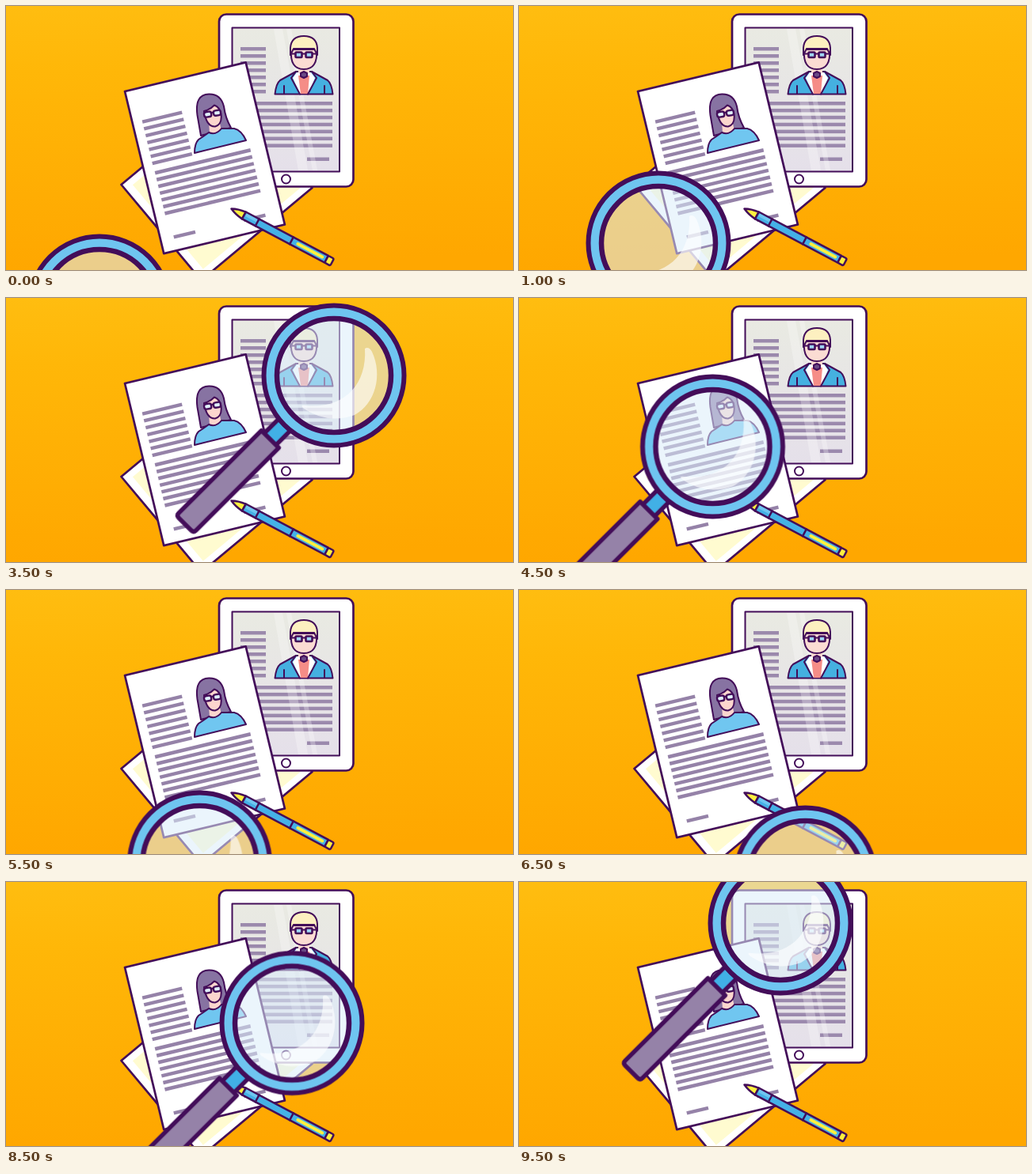
These frames come from a looping animation (640x334 px, 10 s). An HTML page:

```html
<!DOCTYPE html>
<html lang="en">
<head>
<meta charset="utf-8">
<title>Reviewing résumés</title>
<style>
  html, body { margin: 0; width: 100%; height: 100%; overflow: hidden; background: #ffb005; }
  svg { display: block; width: 100vw; height: 100vh; }
  .ink { stroke: #430d59; stroke-width: 2.7; stroke-linejoin: round; stroke-linecap: round; }
  .thin { stroke-width: 2; }
  .bar { fill: #9582a8; }
</style>
</head>
<body>
<svg viewBox="0 0 640 334">
  <defs>
    <linearGradient id="sky" x1="0" y1="0" x2=".06" y2="1">
      <stop offset="0" stop-color="#ffbd10"/>
      <stop offset=".25" stop-color="#ffb708"/>
      <stop offset="1" stop-color="#ffa700"/>
    </linearGradient>
    <linearGradient id="screen" x1="0" y1="0" x2="0" y2="1">
      <stop offset="0" stop-color="#e9eae2"/>
      <stop offset="1" stop-color="#e5e0ea"/>
    </linearGradient>
  </defs>
  <rect width="640" height="334" fill="url(#sky)"/>

  <!-- sheet at the back -->
  <g transform="translate(266 228)">
    <path class="ink" fill="#fff" d="M-120.5-2L-19.5 119L120.5 2L19.5-119Z"/>
    <path fill="#fffbd0" transform="scale(.88)" d="M-120.5-2L-19.5 119L120.5 2L19.5-119Z"/>
  </g>

  <!-- tablet -->
  <rect class="ink" x="269" y="10.5" width="169.500" height="218" rx="9" fill="#fff"/>
  <rect class="ink thin" x="285.5" y="27.5" width="135.5" height="182" fill="url(#screen)"/>
  <circle class="ink thin" cx="353.5" cy="219" r="5.5" fill="#fff"/>
  <g id="tabletText" opacity=".92"></g>
  <g fill="#fff" opacity=".28">
    <path d="M338 29H349L381 208H369Z"/>
    <path d="M354 29H360L393 208H387Z"/>
  </g>
  <g class="ink thin">
    <path fill="#45b0e0" d="M339.5 111.5Q341 98 346 94L366 83H386L406 94Q411 98 412.5 111.5Z"/>
    <path fill="#fff" stroke="none" d="M367 84L362 91L371 111H382L390 91L385 84Z"/>
    <path fill="#f58d87" stroke="none" d="M369 88L372 111H381L383 88Z"/>
    <path fill="#fbd9d0" stroke="none" d="M369 74V84L376 89L383 84V74Z"/>
    <path fill="none" d="M366 83L360 91L371 111.5M386 83L392 91L381 111.5M351 101V111M402 101V111"/>
    <path fill="#fbdcd3" d="M360 55Q358 80 376 80Q394 80 392 55Z"/>
    <path fill="#fdf0c0" d="M359 62V53Q360 38 376 38Q392 38 393 53V62L389 54H363Z"/>
    <path fill="none" d="M359 60.5H366M386 60.5H393M374 60.5H378"/>
    <g fill="#9fd6f4" stroke-width="2.6">
      <rect x="365.5" y="58.5" width="8" height="6.5" rx="1"/>
      <rect x="378.5" y="58.5" width="8" height="6.5" rx="1"/>
    </g>
    <path fill="#6a4a86" d="M372 85L376 83L380 85V89L376 91L372 89Z"/>
  </g>

  <!-- front sheet -->
  <g transform="translate(150 108) rotate(-13.5)">
    <rect class="ink" width="157" height="211" fill="#fff"/>
    <g id="sheetText"></g>
  </g>
  <g class="ink thin">
    <path fill="#8773a2" d="M241.500 138Q238 112 256 111.500Q271 111 275 127Q277 142 284 154L246 164Z"/>
    <path fill="#fcd6ce" stroke="none" d="M256 146L257 161Q266 164 272 158L269 144Z"/>
    <path fill="#fcd6ce" d="M250 133Q258 131 263 125.500Q270 128 271.500 137Q273 150 264 152.500Q253 153 250 133Z"/>
    <path fill="#70c6f0" d="M238 186Q238 174 243 169Q249 165 256 160Q265 164 272 155L288 155Q297 157 303 170Z"/>
    <g fill="#dff0fc" stroke-width="2.4" transform="rotate(-9 260 136)">
      <rect x="250" y="133" width="9" height="6.500" rx="2.500"/>
      <rect x="262" y="133" width="9" height="6.500" rx="2.500"/>
      <path d="M259 135H262"/>
    </g>
  </g>

  <!-- pen -->
  <g class="ink" style="stroke-width:2.5" transform="translate(284.5 256.5) rotate(28)">
    <path fill="#fff03f" d="M0 0Q8-4 18-5V5Q8 4 0 0Z"/>
    <rect x="18" y="-5" width="118" height="10" fill="#45b1e6"/>
    <path fill="#70c6f0" stroke="none" d="M20-3.700H36V0H20Z"/>
    <path fill="none" d="M37-5V5M86-5V5"/>
    <path fill="none" stroke="#fff03f" style="stroke-width:4" d="M95 0H130"/>
    <rect x="136" y="-5" width="8" height="10" rx="2" fill="#fff03f"/>
  </g>

  <!-- magnifier, centred on its lens -->
  <g id="glass">
    <g class="ink" style="stroke-width:5.500" transform="rotate(135)">
      <rect x="88" y="-10.500" width="28" height="21" fill="#41b0e6"/>
      <path fill="#9582a8" d="M114-15.500H262Q266-15.500 266-11V11Q266 15.500 262 15.500H114Z"/>
    </g>
    <circle r="72" fill="#dbeef9" fill-opacity=".557"/>
    <path fill="#fff" fill-opacity=".62" d="M39-34Q44-37 48-30C62 0 52 36 26 50Q-8 62-38 42Q-44 37-36 38C10 43 42 14 39-34Z"/>
    <circle r="80.5" fill="none" stroke="#6fc5f0" stroke-width="12"/>
    <circle r="88.5" fill="none" stroke="#430d59" stroke-width="6"/>
    <circle r="72" fill="none" stroke="#430d59" stroke-width="6.5"/>
  </g>
</svg>
<script>
  const NS = 'http://www.w3.org/2000/svg';

  function bars(id, x, y, width, count, pitch) {
    const group = document.getElementById(id);
    for (let i = 0; i < count; i++) {
      const bar = document.createElementNS(NS, 'rect');
      const box = { class: 'bar', x, y: y + i * pitch, width, height: 4.5 };
      for (const key in box) bar.setAttribute(key, box[key]);
      group.append(bar);
    }
  }

  bars('tabletText', 296, 52, 32, 7, 9);
  bars('tabletText', 296, 121, 116, 7, 8.9);
  bars('tabletText', 380, 191.5, 28, 1, 0);
  bars('sheetText', 12.5, 40.5, 51.5, 7, 9);
  bars('sheetText', 13, 107, 124, 7, 8.8);
  bars('sheetText', 17, 191.5, 28, 1, 0);
  bars('sheetText', 108, 191.5, 28, 1, 0);

  // Lens centre, one stop every half second
  const stops = [
    [118, 380], [143.5, 333], [176, 300], [187.5, 267.5], [329.5, 202.5],
    [362, 153], [393, 111], [414, 98], [293.5, 121.5], [244.5, 188],
    [211, 229], [244.5, 345], [211, 369], [361.5, 364], [424.5, 343.5],
    [360, 301], [438.5, 246.5], [361, 178.5], [435.5, 108.5], [330, 52]
  ];
  const frames = [...stops, stops[stops.length - 1]].map(([x, y], i) => ({
    offset: i / stops.length,
    transform: `translate(${x}px, ${y}px)`,
    easing: 'step-end'
  }));
  document.getElementById('glass').animate(frames, { duration: 500 * stops.length, iterations: Infinity });
</script>
</body>
</html>
```
